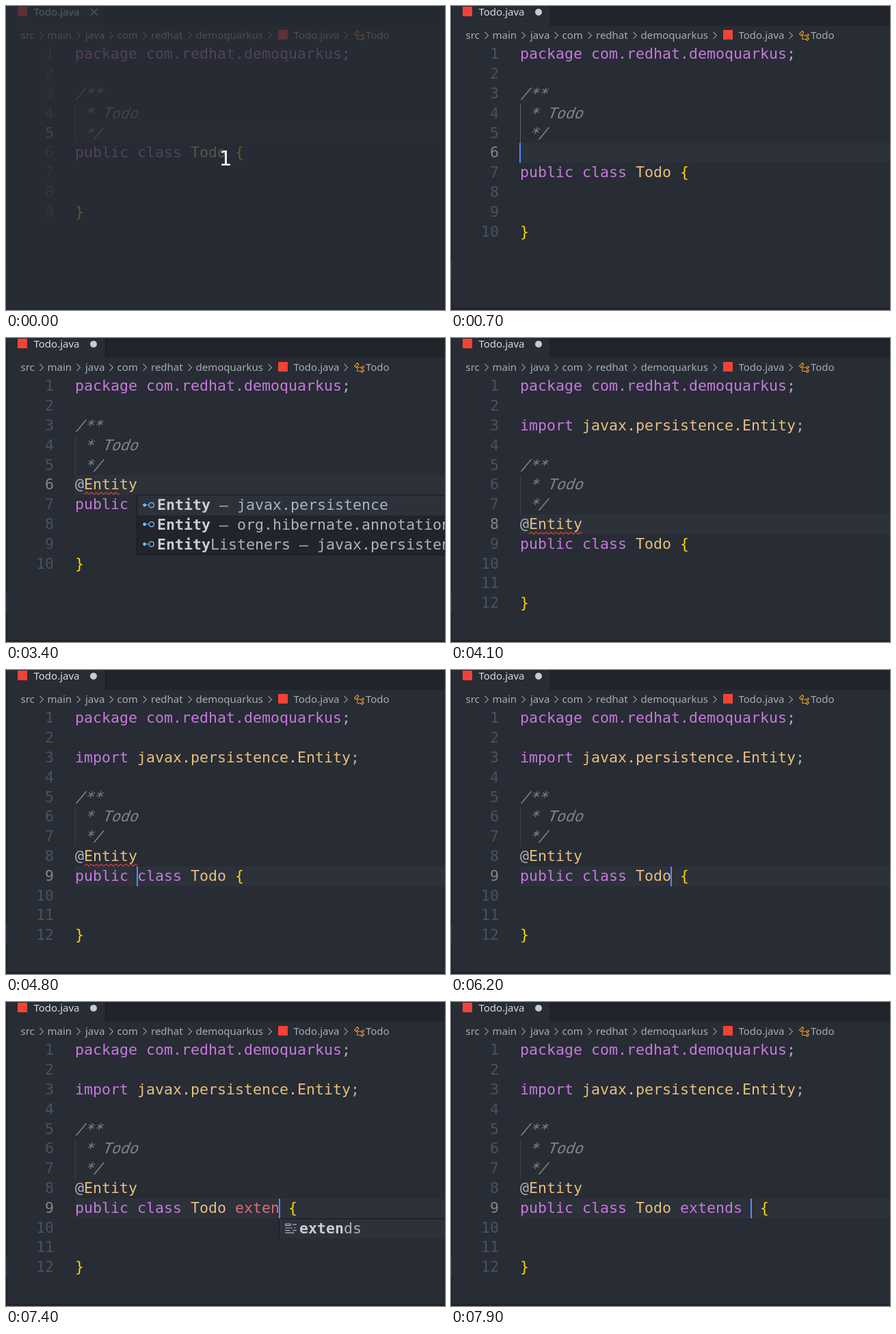
An HTML page that plays this animation: 642 px wide and 444 px high, repeating every 8 s.

```html
<!DOCTYPE html>
<html lang="en">
<head>
<meta charset="utf-8">
<title>Editor typing</title>
<style>
  html, body { margin: 0; width: 100%; height: 100%; overflow: hidden; background: #282c34; }
  #stage { position: relative; width: 642px; height: 444px; overflow: hidden; background: #282c34; color: #abb2bf; }
  #stage div, #stage svg { position: absolute; }
  .ui { font: 15px/26.4px "Noto Sans", "Open Sans", sans-serif; white-space: pre; }
  .mono { font: 21.6px/28.8px "DejaVu Sans Mono", monospace; font-variant-ligatures: none; white-space: pre; }

  .edge { left: 0; top: 0; width: 2px; height: 444px; background: #21252b; }
  .edge-row { left: 0; top: 373px; width: 2px; height: 27px; background: #2c313a; }
  .floor { left: 0; top: 441px; width: 642px; height: 3px; background: #21252b; }
  .tabs { left: 145px; top: 0; width: 497px; height: 29px; background: #21252b; border-left: 1px solid #181a1f; }
  .tab-name { left: 40.5px; top: -5.2px; color: #d7dae0; }
  .file { width: 14px; height: 14px; background: #f44336; }
  .crumb { top: 29px; color: #a6acb7; }
  .dot { left: 123px; top: 4px; width: 10px; height: 10px; border-radius: 50%; background: #c8cbd0; }

  .num { left: 10px; width: 60px; text-align: right; color: #495162; }
  .num.on { color: #7f8591; }
  .row { left: 101px; }
  .k { color: #c678dd; }
  .c { color: #e5c07b; }
  .b { color: #ffd700; }
  .r { color: #e06c75; }
  /* upright face slanted about its baseline */
  .i { color: #7f848e; display: inline-block; transform: skewX(-20deg); transform-origin: 0 76%; }
  #current { left: 101px; width: 541px; height: 28.8px; background: #2c313a; }
  #guide { left: 101px; width: 1px; height: 57.6px; }
  #word { left: calc(101px + 13ch); width: 4ch; top: 286.8px; height: 28.8px; background: #abb2bf26; }
  #caret { width: 2px; height: 28.8px; background: #528bff; }
  #wave { left: calc(101px + 1ch); height: 6px; overflow: hidden; }
  #wave svg { left: 0; top: 0; }

  #list { width: 700px; background: #21252b; border: 1px solid #181a1f; box-sizing: border-box; }
  #list .item { left: 0; width: 100%; height: 28.8px; }
  #list .item:first-child { background: #2c313a; }
  #list .label { left: 28.5px; }
  #list svg { left: 6.5px; top: 4.4px; }
  #list b { color: #c9cdd4; }

  #veil { inset: 0; background: rgba(39, 43, 51, .73); }
  #count { left: 0; width: 642px; top: 201px; text-align: center; color: #f2f3f5; font: 30px/44px "DejaVu Sans", sans-serif; }
</style>
</head>
<body>
<div id="stage">
  <div id="current"></div>
  <div id="guide"></div>
  <div class="mono" id="word"></div>
  <div class="mono" id="code"></div>
  <div class="mono" id="wave"><svg width="90" height="6"><path id="zig" fill="none" stroke="#d0433b" stroke-width="1.2"/></svg></div>
  <div class="mono" id="caret"></div>
  <div class="mono" id="list"></div>

  <div class="tabs"></div>
  <div class="file" style="left:17px;top:1px"></div>
  <div class="ui tab-name">Todo.java</div>
  <svg id="close" style="left:123px;top:3px" width="12" height="12"><path d="M1 1L11 11M11 1L1 11" stroke="#c8cbd0" stroke-width="1.2"/></svg>
  <div class="dot" id="dirty"></div>
  <div id="crumbs"></div>
  <div class="file" style="left:398px;top:35px"></div>
  <svg style="left:507.5px;top:34.5px" width="17.4" height="17.4" viewBox="0 0 16 16" fill="#ee9d28"><path d="M11.34 9.71h.71l2.67-2.67v-.71L13.38 5h-.7l-1.82 1.81h-5V5.56l1.86-1.85V3l-2-2H5L1 5v.71l2 2h.71l1.14-1.15v5.79l.5.5H10v.52l1.33 1.34h.71l2.67-2.67v-.71L13.37 10h-.7l-1.86 1.85h-5v-4H10v.48l1.34 1.38zm1.69-3.65l.63.63-2 2-.63-.63 2-2zm0 5l.63.63-2 2-.63-.63 2-2zM3.35 6.65l-1.29-1.3 3.29-3.29 1.3 1.29-3.3 3.3z"/></svg>

  <div class="edge"></div>
  <div class="edge-row"></div>
  <div class="floor"></div>
  <div id="veil"></div>
  <div id="count">1</div>
</div>
<script>
const LOOP = 8000, TOP = 56.4, ROW = 28.8;
const $ = id => document.getElementById(id);
const rowTop = n => TOP + (n - 1) * ROW;
const span = (cls, text) => `<span class="${cls}">${text}</span>`;
const show = (id, on) => { $(id).style.display = on ? '' : 'none'; };

// Breadcrumb: label, its x, and the centre of the chevron after it
$('crumbs').innerHTML = [
  ['src', 21.5, 52], ['main', 60.5, 106], ['java', 116, 153.5], ['com', 162.5, 203],
  ['redhat', 212, 268.5], ['demoquarkus', 277.5, 385.5], ['Todo.java', 420.5, 497], ['Todo', 526]
].map(([name, x, chevron]) =>
  `<div class="ui crumb" style="left:${x}px">${name}</div>` + (chevron ?
  `<svg style="left:${chevron - 4}px;top:37px" width="8" height="12"><path d="M1.5 1L6.5 6L1.5 11" fill="none" stroke="#8b919c" stroke-width="1.2"/></svg>` : '')
).join('');

$('zig').setAttribute('d', 'M0 4.4' + ' l3.6 -2.8 l3.6 2.8'.repeat(13));

const ICONS = {
  type: ['#75beff', 'M11.496 4a3.49 3.49 0 0 0-3.46 3h-3.1a2 2 0 1 0 0 1h3.1a3.5 3.5 0 1 0 3.46-4zm0 6a2.5 2.5 0 1 1 0-5 2.5 2.5 0 0 1 0 5z'],
  keyword: ['#abb2bf', 'M15 4h-5V3h5v1zm-1 3h-2v1h2V7zm-4 0H1v1h9V7zm2 6H1v1h11v-1zm-5-3H1v1h6v-1zm8 0h-5v1h5v-1zM8 2v3H1V2h7zM7 3H2v1h5V3z']
};

// Suggestions: icon, matched part, rest
const MANAGED = [['type', '', 'ManagedExecutorConfig – io.smallry…']];
const ENTITY = [
  ['type', 'Entity', ' – javax.persistence'],
  ['type', 'Entity', ' – org.hibernate.annotations'],
  ['type', 'Entity', 'Listeners – javax.persistence']
];
const KEYWORD = 'extends';

// Each step changes part of the state from its time on
const steps = [
  [0, { dim: true, dirty: false, guide: true, note: null, imported: false, word: '', done: false,
        line: 5, col: 3, caret: true, list: null, wave: 0, mark: false }],
  [400, { dim: false }],
  [700, { dirty: true, note: '', line: 6, col: 0 }],
  [1000, { note: '@', col: 1, guide: false }],
  [1600, { note: '@E', col: 2 }],
  [1700, { note: '@En', col: 3 }],
  [1800, { note: '@Ent', col: 4 }],
  [1900, { note: '@Enti', col: 5, list: MANAGED }],
  [2500, { caret: false }],
  [2800, { note: '@Entity', col: 7, caret: true, list: null, wave: 4 }],
  [3400, { list: ENTITY, caret: false }],
  [3800, { wave: 6 }],
  [4000, { list: null }],
  [4100, { imported: true, line: 8 }],
  [4200, { caret: true }],
  [4600, { caret: false }],
  [4800, { line: 9, caret: true }],
  [5000, { col: 8, wave: 0 }],
  [5100, { col: 9 }], [5200, { col: 10 }], [5300, { col: 11 }],
  [5500, { col: 12 }], [5600, { col: 13 }],
  [5800, { col: 14 }], [5900, { col: 15 }],
  [6200, { col: 17 }],
  [6500, { mark: true }],
  [6800, { mark: false, word: 'e', col: 19 }]
];
for (let n = 1; n <= KEYWORD.length; n++) {
  const typed = KEYWORD.slice(0, n);
  steps.push([6900 + n * 100, { word: typed, col: 18 + n, list: [['keyword', typed, KEYWORD.slice(n)]] }]);
}
steps.push([7800, { done: true, list: null }], [7900, { word: KEYWORD + ' ', col: 26 }]);

function codeRows(s) {
  const rows = [span('k', 'package com.redhat.demoquarkus') + ';', ''];
  if (s.imported) rows.push(span('k', 'import ') + span('c', 'javax.persistence.Entity') + ';', '');
  rows.push(span('i', '/**'), span('i', ' * Todo'), span('i', ' */'));
  if (s.note !== null) rows.push(s.note.slice(0, 1) + span('c', s.note.slice(1)));
  const word = s.word && ' ' + span(s.done ? 'k' : 'r', s.word);
  rows.push(span('k', 'public class ') + span('c', 'Todo') + word + ' ' + span('b', '{'), '', '', span('b', '}'));
  return rows;
}

function drawList(s) {
  show('list', s.list);
  if (!s.list) return;
  const box = $('list').style;
  box.left = `calc(100.4px + ${s.col}ch)`;
  box.top = rowTop(s.line + 1) + 'px';
  box.height = s.list.length * ROW + 1 + 'px';
  $('list').innerHTML = s.list.map(([icon, hit, rest], n) => {
    const [color, path] = ICONS[icon];
    return `<div class="item" style="top:${n * ROW}px">` +
      `<svg width="19.2" height="19.2" viewBox="0 0 16 16" fill="${color}"><path d="${path}"/></svg>` +
      `<div class="label"><b>${hit}</b>${rest}</div></div>`;
  }).join('');
}

function draw(s) {
  $('code').innerHTML = codeRows(s).map((html, n) => {
    const top = `style="top:${rowTop(n + 1)}px"`;
    return `<div class="num${n + 1 === s.line ? ' on' : ''}" ${top}>${n + 1}</div><div class="row" ${top}>${html}</div>`;
  }).join('');

  const y = rowTop(s.line) + 'px';
  $('current').style.top = y;
  $('caret').style.top = y;
  $('caret').style.left = `calc(100px + ${s.col}ch)`;
  show('caret', s.caret && !s.dim);

  $('guide').style.top = rowTop(s.imported ? 6 : 4) + 'px';
  $('guide').style.background = s.guide ? '#606570' : '#3b4048';
  $('wave').style.top = rowTop(s.imported ? 8 : 6) + 24 + 'px';
  $('wave').style.width = s.wave + 'ch';

  show('word', s.mark);
  show('close', !s.dirty);
  show('dirty', s.dirty);
  show('veil', s.dim);
  show('count', s.dim);
  drawList(s);
}

const start = performance.now();
let shown = 0;
function tick() {
  const t = Math.max(0, performance.now() - start) % LOOP;
  const past = steps.filter(([at]) => at <= t);
  if (past.length !== shown) {
    shown = past.length;
    draw(Object.assign({}, ...past.map(([, change]) => change)));
  }
  requestAnimationFrame(tick);
}
tick();
</script>
</body>
</html>
```
